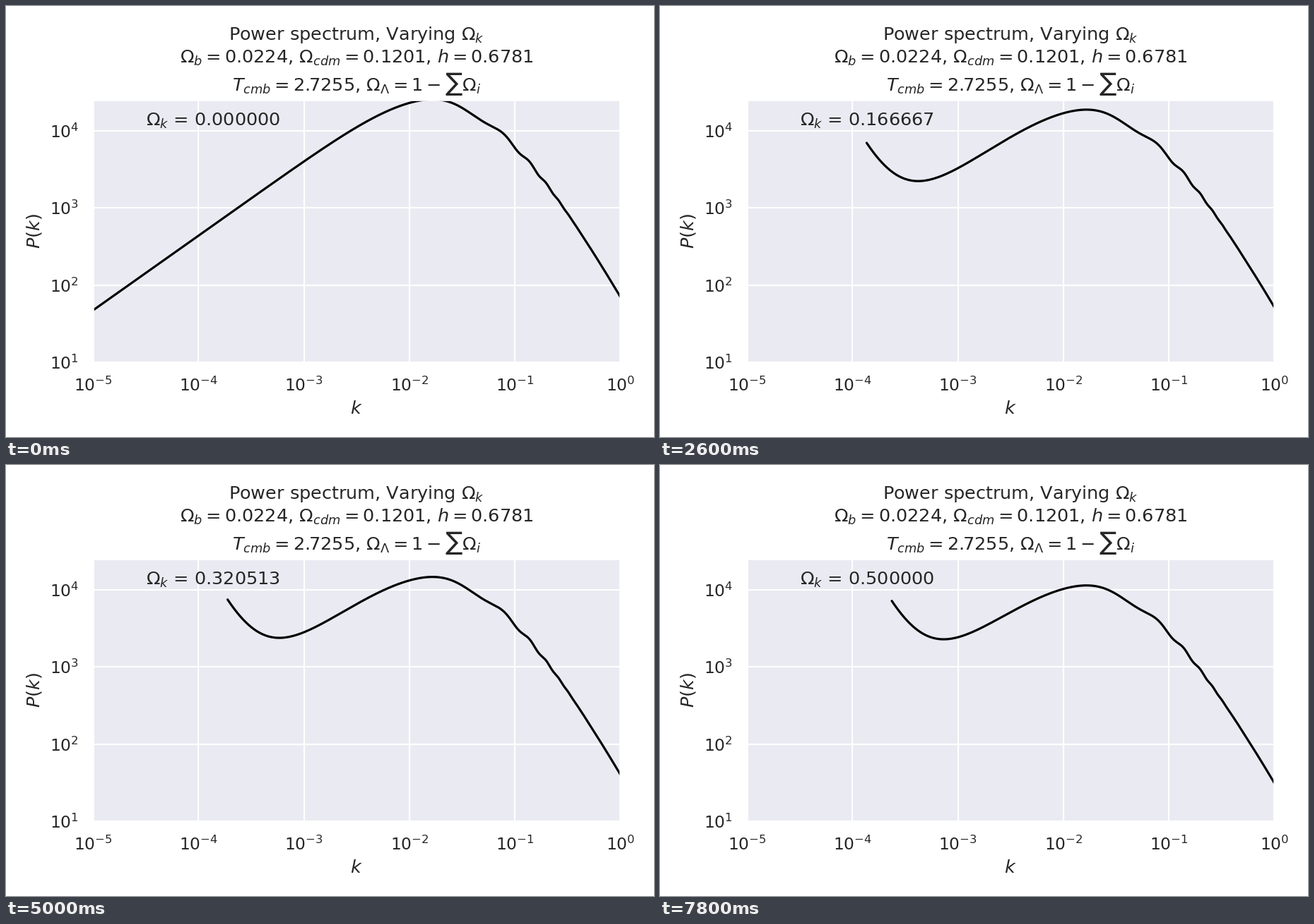
A matplotlib script that plays this animation: 917x611 px, repeating every 8 s.

```python
import numpy as np
import matplotlib.pyplot as plt
from matplotlib.animation import FuncAnimation

W, H, DPI = 917, 611, 128
PT = W / 6 / DPI            # one point of a 6-inch-wide layout
FRAMES, INTERVAL = 40, 200
INK, PANEL = "#262626", "#EAEAF2"

# Cosmology
h, wb, wc, Tcmb, ns = 0.6781, 0.0224, 0.1201, 2.7255, 0.966
wm = wb + wc
Om = wm / h**2
HUBBLE = 2997.92            # c / H0 in Mpc/h
P_LOW = 47.2                # flat-space power at k = 1e-5


def transfer(k):
    """Eisenstein-Hu matter transfer function, k in 1/Mpc."""
    th = Tcmb / 2.7
    fb, fc = wb / wm, wc / wm
    zeq = 2.5e4 * wm / th**4
    keq = 0.0746 * wm / th**2
    b1 = 0.313 * wm**-0.419 * (1 + 0.607 * wm**0.674)
    b2 = 0.238 * wm**0.223
    zd = 1291 * wm**0.251 / (1 + 0.659 * wm**0.828) * (1 + b1 * wb**b2)
    Rd, Req = (31.5 * wb / th**4 * 1000 / z for z in (zd, zeq))
    s = 2 / (3 * keq) * np.sqrt(6 / Req) * np.log(
        (np.sqrt(1 + Rd) + np.sqrt(Rd + Req)) / (1 + np.sqrt(Req)))
    silk = 1.6 * wb**0.52 * wm**0.73 * (1 + (10.4 * wm)**-0.95)

    a1 = (46.9 * wm)**0.67 * (1 + (32.1 * wm)**-0.532)
    a2 = (12 * wm)**0.424 * (1 + (45 * wm)**-0.582)
    alpha_c = a1**-fb * a2**-(fb**3)
    c1 = 0.944 / (1 + (458 * wm)**-0.708)
    c2 = (0.395 * wm)**-0.0266
    beta_c = 1 / (1 + c1 * (fc**c2 - 1))

    y = (1 + zeq) / (1 + zd)
    r = np.sqrt(1 + y)
    G = y * (-6 * r + (2 + 3 * y) * np.log((r + 1) / (r - 1)))
    alpha_b = 2.07 * keq * s * (1 + Rd)**-0.75 * G
    beta_b = 0.5 + fb + (3 - 2 * fb) * np.sqrt((17.2 * wm)**2 + 1)
    node = 8.41 * wm**0.435

    q = k / (13.41 * keq)
    ks = k * s

    def t0(a, b):
        C = 14.2 / a + 386 / (1 + 69.9 * q**1.08)
        L = np.log(np.e + 1.8 * b * q)
        return L / (L + C * q**2)

    f = 1 / (1 + (ks / 5.4)**4)
    cold = f * t0(1, beta_c) + (1 - f) * t0(alpha_c, beta_c)
    wave = np.sinc(ks / (1 + (node / ks)**3)**(1 / 3) / np.pi)
    baryon = wave * (t0(1, 1) / (1 + (ks / 5.2)**2)
                     + alpha_b / (1 + (beta_b / ks)**3) * np.exp(-(k / silk)**1.4))
    return fb * baryon + fc * cold


def growth(Ok):
    OL = 1 - Om - Ok
    return 2.5 * Om / (Om**(4 / 7) - OL + (1 + Om / 2) * (1 + OL / 70))


def spectrum(Ok):
    curv = np.sqrt(Ok) / HUBBLE          # smallest mode of open space
    k = np.geomspace(max(curv, 8e-6), 1.15, 900)
    P = P_LOW * (k / 1e-5)**ns * transfer(k * h)**2
    P *= (growth(Ok) / growth(0))**2 * (1 + 3 * (curv / k)**2)**2
    return k, P


plt.rcParams.update({
    "font.family": "DejaVu Sans", "mathtext.fontset": "dejavusans",
    "font.size": 12 * PT, "text.color": INK, "axes.labelcolor": INK,
    "axes.axisbelow": True,
})

fig = plt.figure(figsize=(W / DPI, H / DPI), dpi=DPI, facecolor="white")
left, right, top, bottom = 123.2, 869.2, 132.9, 505.2
ax = fig.add_axes([left / W, 1 - bottom / H, (right - left) / W, (bottom - top) / H],
                  facecolor=PANEL)
ax.set(xscale="log", yscale="log", xlim=(1e-5, 1), ylim=(10, 25000))
ax.set_xticks(10.0**np.arange(-5, 1))
ax.set_yticks(10.0**np.arange(1, 5))
ax.minorticks_off()
ax.tick_params(bottom=False, left=False, length=6 * PT, pad=3.5 * PT,
               labelsize=11 * PT, labelcolor=INK)
ax.grid(True, color="white", lw=PT, ls="-")
for spine in ax.spines.values():
    spine.set(color="white", linewidth=1.25 * PT)

ax.set_xlabel("$k$", fontsize=12 * PT, labelpad=4 * PT)
ax.set_ylabel("$P(k)$", fontsize=12 * PT, labelpad=4 * PT)
ax.set_title("Power spectrum, Varying $\\Omega_k$\n"
             "$\\Omega_b=0.0224$, $\\Omega_{cdm}=0.1201$, $h=0.6781$\n"
             "$T_{cmb}=2.7255$, $\\Omega_\\Lambda=1-\\sum\\Omega_i$",
             fontsize=12 * PT, pad=6 * PT)

line, = ax.plot([], [], color="black", lw=1.5 * PT, solid_capstyle="round")
label = ax.text(0.1, 0.9, "", transform=ax.transAxes, fontsize=12 * PT)


def update(i):
    Ok = 0.5 * i / (FRAMES - 1)
    line.set_data(*spectrum(Ok))
    label.set_text(f"$\\Omega_k$ = {Ok:.6f}")
    return line, label


anim = FuncAnimation(fig, update, frames=FRAMES, interval=INTERVAL,
                     repeat=True, repeat_delay=0)
plt.show()
```
